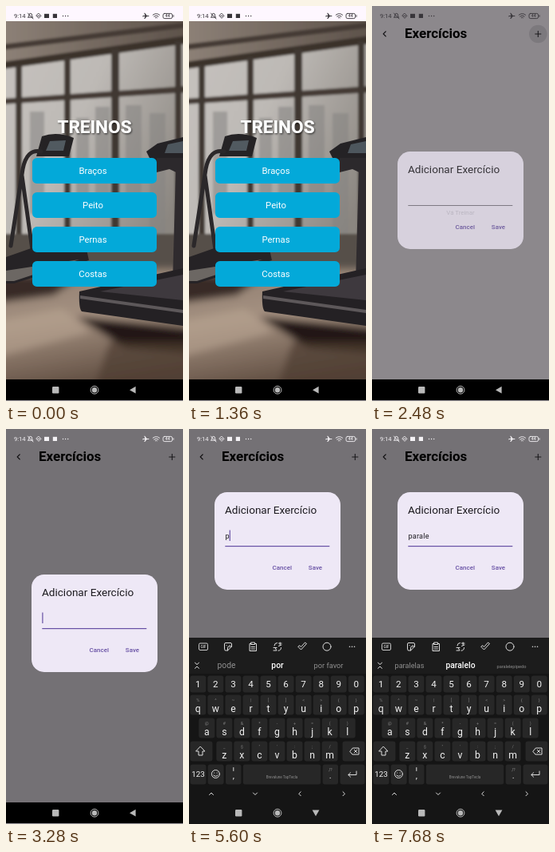
Write an HTML page that moves like this. It is 222 px wide and 494 px high and loops after 8000 ms.

```html
<!DOCTYPE html>
<html lang="pt">
<head>
<meta charset="utf-8">
<title>Treinos</title>
<style>
html, body { margin: 0; width: 100%; height: 100%; overflow: hidden; background: #000; }
svg { display: block; width: 100vw; height: 100vh; font-family: Roboto, "Open Sans", sans-serif; }
.mid { text-anchor: middle; }
.line { fill: none; stroke: currentColor; stroke-linecap: round; stroke-linejoin: round; }
</style>
</head>
<body>
<svg id="stage" viewBox="0 0 222 494">
  <defs>
    <linearGradient id="floor" x1="0" y1="0" x2=".25" y2="1">
      <stop offset="0" stop-color="#8b7a6d"/><stop offset=".45" stop-color="#a59181"/><stop offset="1" stop-color="#5b493d"/>
    </linearGradient>
    <linearGradient id="panes" x1="0" y1="0" x2="1" y2=".6">
      <stop offset="0" stop-color="#c6c2be"/><stop offset=".45" stop-color="#bdb9b5"/><stop offset="1" stop-color="#8b8680"/>
    </linearGradient>
    <linearGradient id="ceiling" x1="0" y1="0" x2="1" y2="0">
      <stop offset="0" stop-color="#8d8177"/><stop offset="1" stop-color="#5d524a"/>
    </linearGradient>
    <filter id="soft"><feGaussianBlur stdDeviation="1.5"/></filter>
    <filter id="slight"><feGaussianBlur stdDeviation=".6"/></filter>
    <filter id="hazy" x="-20%" y="-30%" width="140%" height="160%"><feGaussianBlur stdDeviation="5"/></filter>
    <filter id="glow" x="-20%" y="-50%" width="140%" height="200%">
      <feDropShadow dx="1" dy="1.2" stdDeviation="1" flood-color="#000" flood-opacity=".65"/>
    </filter>
    <clipPath id="photoClip"><rect y="19" width="222" height="448"/></clipPath>
    <clipPath id="screenClip"><rect width="222" height="467"/></clipPath>
  </defs>

  <rect width="222" height="494" fill="#fef7ff"/>
  <g clip-path="url(#screenClip)">
    <g id="home">
      <g clip-path="url(#photoClip)">
        <rect y="19" width="222" height="448" fill="#8b8783"/>
        <g filter="url(#soft)">
          <rect x="-5" y="45" width="232" height="290" fill="url(#panes)"/>
          <path d="M30 132H48V260H30ZM88 140H104V260H88ZM112 126H130V250H112ZM150 124H170V240H150ZM180 134H200V300H180Z" fill="#858481" opacity=".55"/>
          <path d="M-5 10H227V40L-5 72Z" fill="url(#ceiling)"/>
          <path d="M-5 48L227 20V27L-5 55Z" fill="#453b34"/>
          <path d="M-5 70L227 37V47L-5 79Z" fill="#3b322c"/>
          <path d="M-5 116L227 100V108L-5 123Z" fill="#443b35"/>
          <path d="M12 74h8V320h-8ZM73 64h8V320h-8ZM132 54h10V320h-10ZM212 44h8V310h-8Z" fill="#3f3731"/>
          <path d="M-5 285H227V335H-5Z" fill="#575049"/>
        </g>
        <g filter="url(#hazy)">
          <rect x="-15" y="328" width="252" height="160" fill="url(#floor)"/>
          <path d="M-15 336H96L60 362L-15 372Z" fill="#382b25"/>
          <path d="M88 388L237 404V434L150 428Z" fill="#221915"/>
          <path d="M130 420L237 420V480H110Z" fill="#4e3c31" opacity=".7"/>
          <path d="M-15 395L70 378L105 408L-15 440Z" fill="#b7a392" opacity=".6"/>
        </g>
        <g filter="url(#slight)">
          <path d="M45 163Q64 156 85 165L79 188H38Z" fill="#252325"/>
          <path d="M55 169L75 168L72 181H50Z" fill="#515a60"/>
          <path class="line" d="M44 182Q26 178 21 204L6 300M20 212L34 312" stroke-width="5" color="#2b282a"/>
          <path d="M0 314L40 300H100L104 318L10 347H0Z" fill="#262326"/>
          <path d="M0 331L92 317L10 344H0Z" fill="#6c6763"/>
          <path d="M176 182L190 172L222 164V196H183Z" fill="#242225"/>
          <path d="M203 173L222 169V184H199Z" fill="#4d565d"/>
          <path d="M189 190H222V212L205 204L189 208Z" fill="#2c292c"/>
          <path d="M213 205H222V345H209Z" fill="#2f2b2e"/>
          <path d="M92 357L150 344L222 328V400L95 382Q91 378 92 357Z" fill="#242124"/>
          <path d="M118 357L222 336V368Z" fill="#3e393e"/>
          <path d="M93 362L222 380V384L93 366Z" fill="#5d585a"/>
        </g>
      </g>
      <text class="mid" x="111" y="159" font-size="22.6" font-weight="700" fill="#fff" filter="url(#glow)">TREINOS</text>
      <g id="groups"></g>
    </g>
    <g id="page">
      <rect width="222" height="467" fill="#fef7ff"/>
      <path class="line" d="M17.2 31.9L14.2 34.9L17.2 37.9" stroke-width="1.3" color="#1d1b20"/>
      <text x="41" y="40.4" font-size="16.95" font-weight="700" fill="#000">Exercícios</text>
      <path d="M204.3 35H212.3M208.3 31V39" stroke="#3b383f" stroke-width="1.1"/>
      <text id="hint" class="mid" x="111" font-size="7.9" fill="#1d1b20">Vá Treinar</text>
      <circle id="ripple" cx="208.3" cy="35" r="11.3"/>
    </g>
    <rect id="barrier" width="222" height="467"/>
    <g id="dialog">
      <rect x="32" width="158" height="122" rx="15.8" fill="#eee8f6"/>
      <text x="45" y="27" font-size="13.56" fill="#1d1b20">Adicionar Exercício</text>
      <text id="input" x="45.4" y="58.3" font-size="9.04" letter-spacing=".28" fill="#1d1b20"></text>
      <rect id="cursor" y="47.5" width="1.2" height="13.5" fill="#6750a4"/>
      <rect id="underline" x="45.3" width="131"/>
      <g class="mid" font-size="7.9" font-weight="500" letter-spacing=".06" fill="#6750a4">
        <text x="116.8" y="97">Cancel</text><text x="158.5" y="97">Save</text>
      </g>
    </g>
  </g>

  <g id="status">
    <text x="10" y="15.2" font-size="7.6" fill="currentColor">9:14</text>
    <g class="line" stroke-width=".9">
      <path d="M27.7 14.2H33.7L32.6 12.7V11Q32.4 9.4 30.7 9.3Q29 9.4 28.8 11V12.7ZM27.5 9L34 16"/>
      <path d="M41 9.3L44 12.3L41 15.3L38 12.3ZM39.7 12.3H42.3"/>
      <path d="M184.2 11.2Q188.4 7.8 192.6 11.2M185.7 13Q188.4 10.9 191.1 13M187.3 14.7Q188.4 13.9 189.5 14.7"/>
      <rect x="197" y="9.4" width="11.5" height="6.2" rx="1.8"/>
      <path d="M210 11.6V13.4"/>
    </g>
    <g fill="currentColor">
      <rect x="48" y="9.8" width="6" height="5.2"/>
      <rect x="58.8" y="9.8" width="5.2" height="5.2"/>
      <circle cx="71.5" cy="12.5" r=".7"/><circle cx="74.6" cy="12.5" r=".7"/><circle cx="77.7" cy="12.5" r=".7"/>
      <path d="M171.5 11.9H174.5L173.2 8.8H174.2L176.7 11.9H179.1Q179.9 12.4 179.1 12.9H176.7L174.2 16H173.2L174.5 12.9H172.4L171.5 13.8Z"/>
      <text class="mid" x="202.7" y="14.4" font-size="5.2" font-weight="500">44</text>
    </g>
  </g>

  <rect y="467" width="222" height="26.4"/>
  <g id="keyboard"></g>
  <g fill="#b9b9b9">
    <rect x="58" y="476" width="8.4" height="8.4" rx="1.2"/>
    <circle cx="111" cy="480.2" r="3.2"/>
    <circle cx="111" cy="480.2" r="4.9" fill="none" stroke="#b9b9b9"/>
    <path id="back" d="M155 480.2L162.6 475.8V484.6Z"/>
  </g>
</svg>

<script>
const LOOP = 8000, STEP = 80, FOCUS = 3280;
const $ = id => document.getElementById(id);
const clamp = u => Math.max(0, Math.min(1, u));
const span = (t, from, length) => clamp((t - from) / length);
const easeOut = (u, power) => 1 - (1 - u) ** power;
const latest = (list, t) => list.filter(entry => entry[0] <= t).pop();
const text = (x, y, size, value, fill = '#f2f2f2') =>
  `<text class="mid" x="${x}" y="${y}" font-size="${size}" fill="${fill}">${value.replace('&', '&amp;').replace('<', '&lt;')}</text>`;
const box = (x, y, w, h, fill = '#272727') =>
  `<rect x="${x}" y="${y}" width="${w}" height="${h}" rx="3" fill="${fill}"/>`;
const line = (d, width = 1) => `<path class="line" d="${d}" stroke-width="${width}"/>`;

$('groups').innerHTML = ['Braços', 'Peito', 'Pernas', 'Costas'].map((name, i) => {
  const y = 190 + 43 * i;
  return `<rect x="33" y="${y}" width="156" height="32" rx="5.6" fill="#03a9d9"/>` + text(109, y + 20, 11.3, name, '#fff');
}).join('');

const rows = [
  { keys: '1234567890', hints: '', x: 11.3, y: 308.5, h: 21 },
  { keys: 'qwertyuiop', hints: '%^~|[]<>{}', x: 11.3, y: 332.5, h: 25 },
  { keys: 'asdfghjkl', hints: '@#&*-+=()', x: 22.3, y: 361.5, h: 25 },
  { keys: 'zxcvbnm', hints: '_$"\':;/', x: 44.3, y: 390.5, h: 25 }
];
const keySpots = {};

function drawRow({ keys, hints, x, y, h }) {
  return [...keys].map((key, i) => {
    const cx = x + 22.05 * i;
    keySpots[key] = { cx, y, h };
    const label = hints
      ? text(cx, y + 8, 5.6, hints[i], '#7a7a7a') + text(cx, y + 21.3, 12.2, key)
      : text(cx, y + 14.6, 11.6, key);
    return box(cx - 10, y, 20, h) + label;
  }).join('');
}

function drawKeyboard() {
  const toolbar =
    '<rect x="12.5" y="268" width="11" height="8.5" rx="1.5" fill="none" stroke="#ddd" stroke-width=".9"/>' +
    text(18, 274.1, 4.8, 'GIF') +
    line('M53.5 272V269Q53.5 267.5 52 267.5H46Q44.5 267.5 44.5 269V275.5Q44.5 277 46 277H48.5L53.5 272H50Q48.5 272 48.5 273.5V277M47 270.5H47.1M51 270.5H51.1') +
    line('M78 268.5H76V277.5H84.5V268.5H82.5M78 267H82.5V269.5H78ZM78 272.5H82.5M78 275H82.5') +
    line('M107 271Q107 267.5 110.5 267.5M115.5 273.5Q115.5 277.2 112 277.2M112.5 268H116M114.2 267V270.5M112.5 271.5L116 270M106 273.5H110M106 277H110L108 273.5') +
    line('M137 272.5L140.5 276L147.5 268.5L145.5 267L140.5 272.5L139 271Z') +
    '<circle cx="173" cy="272.2" r="5" class="line" stroke-width="1"/>' +
    [201.5, 204.5, 207.5].map(x => `<circle cx="${x}" cy="272.2" r=".8" fill="#ddd"/>`).join('');
  const bottom =
    box(1.5, 419.5, 20, 25) + text(11.5, 434.6, 9.8, '123') +
    box(23.6, 419.5, 20, 25) + '<circle cx="33.4" cy="431.5" r="5" class="line" stroke-width="1"/>' +
    line('M31.6 430V430.1M35.2 430V430.1M30.8 433Q33.4 435.8 36 433') +
    box(46, 419.5, 19.5, 25) + text(55.8, 436.5, 11, ',') + line('M55.8 423.5V427.5') +
    box(67.8, 419.5, 97.5, 25) + text(116.5, 437.2, 4.6, 'Brevalune TapTecla', '#8d8d8d') +
    box(167.6, 419.5, 19.5, 25) + text(177.3, 436.5, 11, '.') + text(177.3, 427.5, 5, ',!?', '#8d8d8d') +
    box(189.5, 419.5, 31, 25) + line('M210 428V432.5H200M202.6 429.8L199.8 432.5L202.6 435.2');
  const edges =
    box(1.5, 390.5, 28, 25) + line('M14.5 397.3L20 403H17V408H12V403H9Z') +
    box(192.5, 390.5, 28, 25) + line('M202 403L205.3 399H213V407H205.3ZM207.3 401.3L210.7 404.7M210.7 401.3L207.3 404.7');
  const arrows = line('M25.5 457.5L28 455L30.5 457.5M80.5 455L83 457.5L85.5 455M140.2 453.7L137.7 456.2L140.2 458.7M193 453.7L195.5 456.2L193 458.7');
  const expand = line('M7.5 292.3L10 294.5L12.5 292.3M7.5 299.3L10 297L12.5 299.3');
  $('keyboard').innerHTML =
    '<rect y="261" width="222" height="240" fill="#151515"/><rect y="261" width="222" height="45" fill="#1c1c1c"/>' +
    `<g color="#ddd">${toolbar}${expand}${rows.map(drawRow).join('')}${edges}${bottom}${arrows}</g>` +
    '<g id="words"></g><g id="popup"></g>';
}

const edits = [
  [FOCUS, ''], [4480, 'p'], [4640, 'pa'], [4720, 'paa'], [5280, 'pa'], [5600, 'p'],
  [6160, 'pa'], [6480, 'par'], [6640, 'para'], [7040, 'paral'], [7200, 'parale']
];
const presses = [
  [4400, 'p'], [4560, 'a'], [6080, 'a'], [6400, 'r'], [6560, 'a'], [6880, 'l', 160], [7120, 'e']
];
const suggestions = [
  [0, 'super,sapato,eu'], [4480, 'pode,por,por favor'], [4720, 'parabéns,para,passar'],
  [5600, 'pode,por,por favor'], [6240, 'parabéns,para,passar'], [6480, 'partir,para,parte'],
  [6640, 'parabéns,para,parada'], [7040, 'paralela,paralelo,paralisar'],
  [7280, 'paralelas,paralelo,paralelepípedo']
];

let shownWords = '';
function showWords(words) {
  if (words === shownWords) return;
  shownWords = words;
  $('words').innerHTML = words.split(',').map((word, i) =>
    text(47 + 64 * i, 299.4, 10.3, word, i === 1 ? '#fff' : '#8f8f8f')).join('');
  for (const node of $('words').children) {
    const fit = Math.min(1, 37 / node.getComputedTextLength());
    node.setAttribute('font-size', 10.3 * fit);
  }
  if (!words.startsWith('super')) $('words').children[1].setAttribute('font-weight', 500);
}

function showPopup(t) {
  const press = presses.find(([at, , hold = STEP]) => t >= at && t < at + hold);
  if (!press) return $('popup').replaceChildren();
  const { cx, y, h } = keySpots[press[1]];
  $('popup').innerHTML = box(cx - 10, y - 28, 20, h + 28, '#454545') + text(cx, y - 10, 14, press[1]);
}

function scaleAround(node, scale) {
  node.setAttribute('transform', `translate(111 243) scale(${scale}) translate(-111 -243)`);
}

function render(t) {
  const opening = span(t, 1360, 240);
  scaleAround($('home'), 1 + 0.05 * easeOut(opening, 2));
  scaleAround($('page'), 0.85 + 0.15 * easeOut(opening, 3));
  $('page').setAttribute('opacity', clamp(opening * 1.3));

  const dialogOpen = t >= 2480, settled = t >= 2560, focused = t >= FOCUS;
  $('ripple').setAttribute('opacity', dialogOpen ? 0.11 * (1 - span(t, 2480, 320)) : 0);
  $('barrier').setAttribute('opacity', settled ? 0.54 : dialogOpen ? 0.45 : 0);
  $('status').setAttribute('color', settled ? '#f4f2f5' : '#38353a');

  // Dialog and centred page text both follow the shrinking view.
  const lift = 103 * easeOut(span(t, 3320, 654), 2);
  $('hint').setAttribute('y', 261 - lift);
  $('dialog').setAttribute('transform', `translate(0 ${182 - lift})`);
  $('dialog').setAttribute('opacity', settled ? 1 : dialogOpen ? 0.77 : 0);
  $('underline').setAttribute('y', focused ? 67 : 67.2);
  $('underline').setAttribute('height', focused ? 1.2 : 0.7);
  $('underline').setAttribute('fill', focused ? '#6750a4' : '#49454f');

  const [editedAt, value] = latest(edits, t) || [Infinity, ''];
  $('input').textContent = value;
  $('cursor').setAttribute('x', 45.3 + (value ? $('input').getComputedTextLength() : 0));
  $('cursor').setAttribute('opacity', focused && Math.floor((t - editedAt) / 480) % 2 === 0 ? 1 : 0);

  const drop = 233 * (1 - easeOut(span(t, 3320, 520), 3));
  $('keyboard').setAttribute('transform', `translate(0 ${drop})`);
  $('back').setAttribute('transform', t >= 3360 ? 'rotate(-90 159 480.2)' : '');
  showWords(latest(suggestions, t)[1]);
  showPopup(t);
}

drawKeyboard();
const start = performance.now();
function tick() {
  const t = (performance.now() - start) % LOOP;
  render(Math.floor(t / STEP) * STEP);
  requestAnimationFrame(tick);
}
tick();
</script>
</body>
</html>
```
